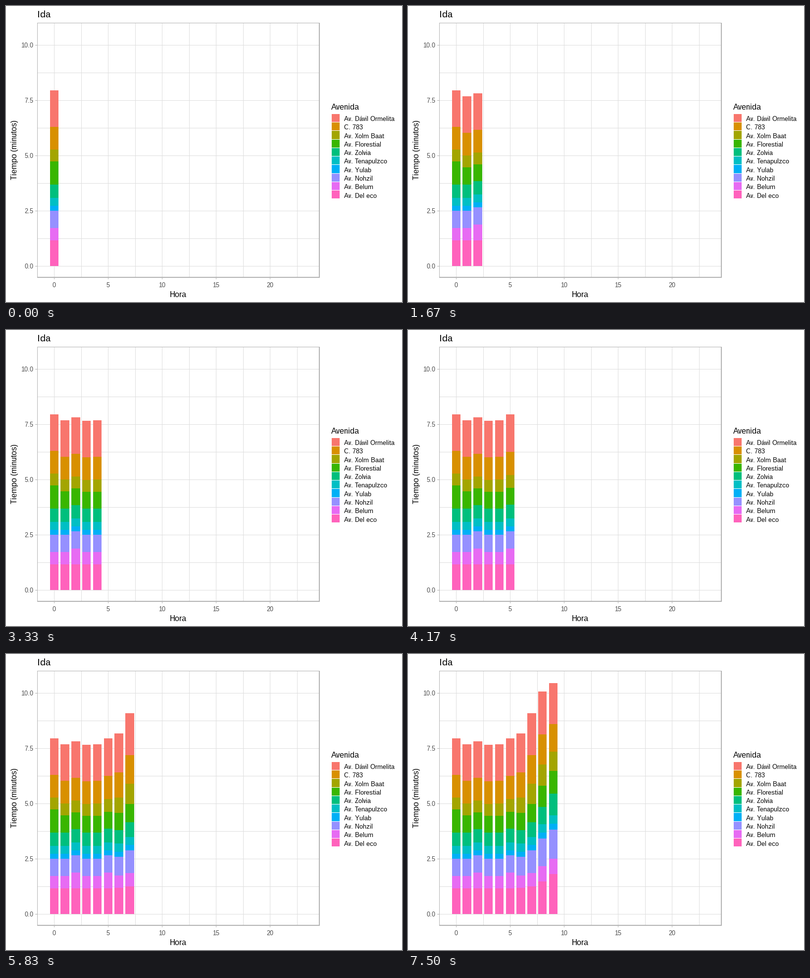
A matplotlib script that plays this animation: 800 by 600 pixels, repeating every 8000 ms.

```python
import matplotlib.pyplot as plt
import numpy as np
from matplotlib.animation import FuncAnimation
from matplotlib.collections import PolyCollection

W, H, DPI = 800, 600, 100
STEP, LOOP = 20, 8000

LEFT, TOP, RIGHT, BOTTOM = 63, 34, 634, 551
BASE = 527
HOUR, BAR_LEFT, BAR_WIDTH = 21.82, 88.51, 17.4
GRID, EDGE, TICK_TEXT = "#dedede", "#b3b3b3", "#4d4d4d"

# Name, colour, night length, rush-hour gain, hour of the peak
STREETS = [
    ("Av. Dávil Ormelita", "#f8766d", 74, 13, 8),
    ("C. 783", "#d89000", 46, 15, 8),
    ("Av. Xolm Baat", "#a3a500", 24, 20, 8),
    ("Av. Florestial", "#39b600", 34, 12, 9),
    ("Av. Zolvia", "#00bf7d", 27, 19, 9.5),
    ("Av. Tenapulzco", "#00bfc4", 16, 1, 8),
    ("Av. Yulab", "#00b0f6", 10, 2, 8.5),
    ("Av. Nohzil", "#9590ff", 35, 25, 8.7),
    ("Av. Belum", "#e76bf3", 25, 6, 9),
    ("Av. Del eco", "#ff62bc", 52, 32, 9.5),
]
NAMES, COLORS, NIGHT, GAIN, PEAK = zip(*STREETS)
NIGHT, GAIN, PEAK = (np.array(v, float) for v in (NIGHT, GAIN, PEAK))
LATE, PULSE = 3, 8  # streets with a midnight and a three-hour rhythm

plt.rcParams.update({
    "font.family": "Liberation Sans",
    "text.hinting": "native",
    "text.hinting_factor": 1,
})
fig = plt.figure(figsize=(W / DPI, H / DPI), dpi=DPI, facecolor="white")
ax = fig.add_axes([0, 0, 1, 1])
ax.set_xlim(0, W)
ax.set_ylim(H, 0)
ax.axis("off")


def box(x0, y0, x1, y1):
    return [(x0, y0), (x1, y0), (x1, y1), (x0, y1)]


def add_boxes(boxes, colors, z):
    group = PolyCollection(boxes, facecolors=colors, linewidths=0,
                           antialiaseds=False, zorder=z)
    return ax.add_collection(group, autolim=False)


def label(x, y, text, px, color="black", **kw):
    ax.text(x, y, text, fontsize=px * 72 / DPI, color=color, **kw)


def lengths(hour):
    """Length of each street's segment, top to bottom."""
    rush = 1 / (1 + np.exp(-1.5 * (hour - 7.05)))
    extra = GAIN * np.exp(-((hour - PEAK) / 1.7) ** 2)
    size = NIGHT + extra * 132 * rush / extra.sum()
    size[LATE] += 13 * np.exp(-3 * hour)
    size[PULSE] += 7 * (hour % 3 == 2) * (1 - rush)
    return size


def stack(hour):
    x0 = round(BAR_LEFT + HOUR * hour)
    x1 = round(BAR_LEFT + BAR_WIDTH + HOUR * hour)
    heights = np.cumsum(lengths(hour)[::-1])[::-1]
    edges = [round(BASE - h) for h in heights] + [BASE]
    return [box(x0, a, x1, b) for a, b in zip(edges, edges[1:])]


# Grid, border and ticks
cols = [int(97.5 + 54.5 * k) for k in range(10)]
rows = [BASE - 56 * k for k in range(9)]
add_boxes([box(x, TOP, x + 1, BOTTOM) for x in cols]
          + [box(LEFT, y, RIGHT, y + 1) for y in rows], GRID, 1)
add_boxes([box(LEFT, TOP, LEFT + 1, BOTTOM), box(LEFT, TOP, RIGHT, TOP + 1),
           box(RIGHT - 2, TOP, RIGHT, BOTTOM),
           box(LEFT, BOTTOM - 2, RIGHT, BOTTOM)]
          + [box(x, BOTTOM, x + 1, BOTTOM + 3) for x in cols[::2]]
          + [box(LEFT - 4, y, LEFT, y + 1) for y in rows[::2]], EDGE, 3)

for k, x in enumerate(cols[::2]):
    label(x, 570, str(5 * k), 13, TICK_TEXT, ha="center")
for k, y in enumerate(rows[::2]):
    label(55.5, y + 5, f"{2.5 * k:.1f}", 13, TICK_TEXT, ha="right")

label(63, 23, "Ida", 19)
label(348, 590, "Hora", 16, ha="center")
label(22, 291, "Tiempo (minutos)", 16, rotation=90, ha="center",
      va="baseline", rotation_mode="anchor")

# Legend
label(657, 210, "Avenida", 16)
gaps = [round(217.78 + 17.27 * k) for k in range(len(STREETS) + 1)]
add_boxes([box(658, a + 1, 674, b) for a, b in zip(gaps, gaps[1:])], COLORS, 2)
for k, name in enumerate(NAMES):
    label(683, round(233 + 17.28 * k), name, 13)

stacks = [stack(hour) for hour in range(10)]
bars = add_boxes(stacks[0], COLORS, 2)


def update(i):
    # One more hour every 2500/3 ms
    count = 1 + (i * STEP + 14) * 3 // 2500
    bars.set_verts(sum(stacks[:count], []))
    return [bars]


anim = FuncAnimation(fig, update, frames=LOOP // STEP, interval=STEP,
                     repeat=True, repeat_delay=0, blit=False)
plt.show()
```
